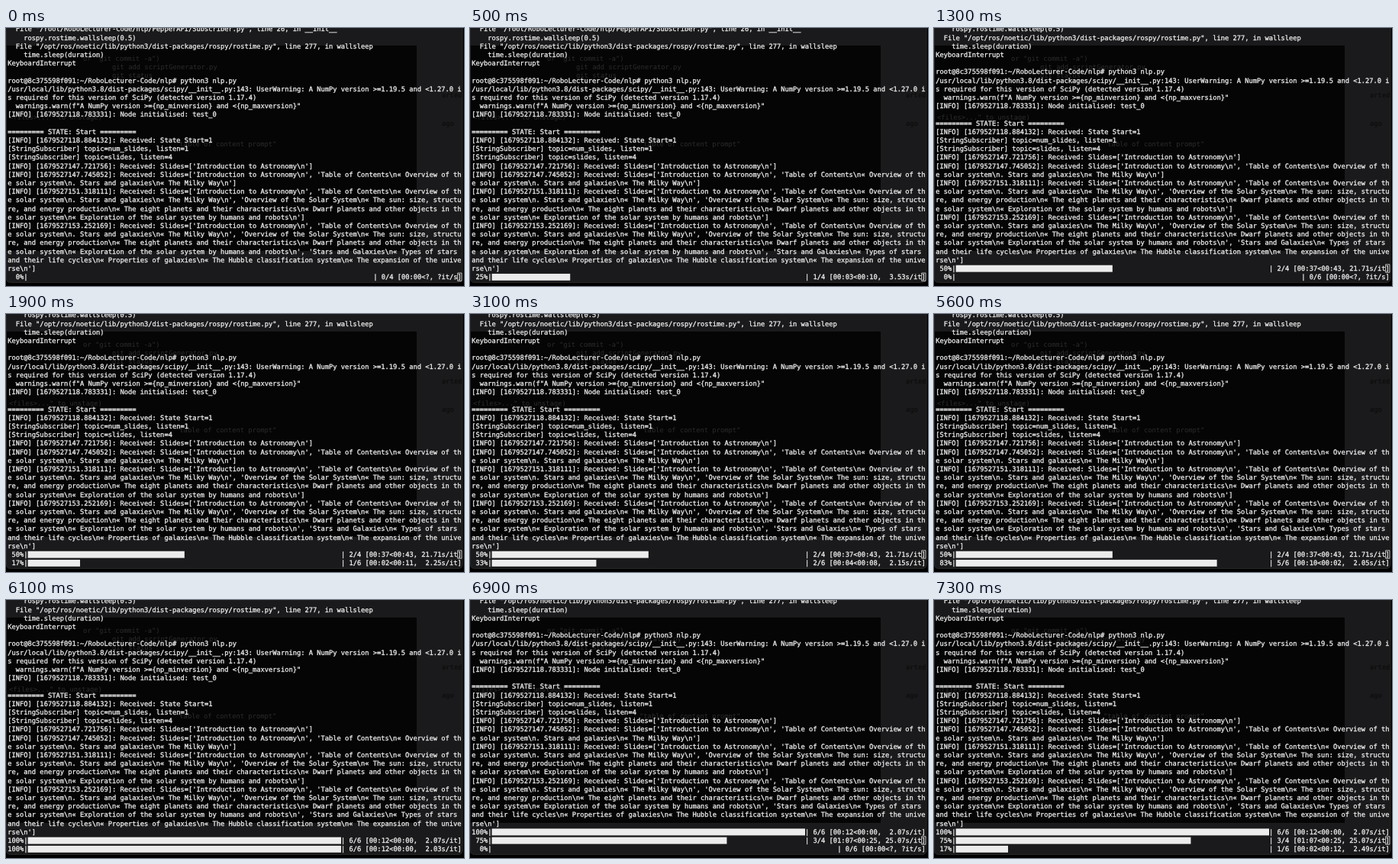
Write an HTML page with a canvas that moves like this. It is 600x338 px and loops after 8000 ms.

```html
<!DOCTYPE html>
<html lang="en">
<head>
<meta charset="utf-8">
<title>Terminal progress</title>
<style>
  html, body { margin: 0; width: 100%; height: 100%; overflow: hidden; background: #000; }
  canvas { display: block; width: 600px; height: 338px; }
</style>
</head>
<body>
<canvas id="stage"></canvas>
<script>
const W = 600, H = 338, LOOP = 8000;
const COLS = 113, CELL = 5.262, LEFT = 2.3, PITCH = 11.2, LAST_Y = 326;
const MONO = '"DejaVu Sans Mono", "Liberation Mono", monospace';
const TEXT = '#ececec';

const canvas = document.getElementById('stage');
const ctx = canvas.getContext('2d');
const dpr = window.devicePixelRatio || 1;
canvas.width = W * dpr;
canvas.height = H * dpr;
ctx.scale(dpr, dpr);

// Slide outlines, as logged after each update
const intro = String.raw`'Introduction to Astronomy\n'`;
const contents = String.raw`'Table of Contents\n« Overview of the solar system\n. Stars and galaxies\n« The Milky Way\n'`;
const solar = String.raw`'Overview of the Solar System\n« The sun: size, structure, and energy production\n« The eight planets and their characteristics\n« Dwarf planets and other objects in the solar system\n« Exploration of the solar system by humans and robots\n'`;
const stars = String.raw`'Stars and Galaxies\n« Types of stars and their life cycles\n« Properties of galaxies\n« The Hubble classification system\n« The expansion of the universe\n'`;

const info = (time, msg) => `[INFO] [1679527${time}]: ${msg}`;
const slides = (time, ...list) => info(time, `Received: Slides=[${list.join(', ')}]`);

const log = [
  '  File "/root/RoboLecturer-Code/nlp/PepperAPI/Subscriber.py", line 26, in __init__',
  '    rospy.rostime.wallsleep(0.5)',
  '  File "/opt/ros/noetic/lib/python3/dist-packages/rospy/rostime.py", line 277, in wallsleep',
  '    time.sleep(duration)',
  'KeyboardInterrupt',
  '',
  'root@8c375598f091:~/RoboLecturer-Code/nlp# python3 nlp.py',
  '/usr/local/lib/python3.8/dist-packages/scipy/__init__.py:143: UserWarning: A NumPy version >=1.19.5 and <1.27.0 is required for this version of SciPy (detected version 1.17.4)',
  '  warnings.warn(f"A NumPy version >={np_minversion} and <{np_maxversion}"',
  info('118.783331', 'Node initialised: test_0'),
  '',
  '========= STATE: Start =========',
  info('118.884132', 'Received: State Start=1'),
  '[StringSubscriber] topic=num_slides, listen=1',
  '[StringSubscriber] topic=slides, listen=4',
  slides('147.721756', intro),
  slides('147.745052', intro, contents),
  slides('151.318111', intro, contents, solar),
  slides('153.252169', intro, contents, solar, stars)
];

// Hard wrap at the terminal width
const rows = log.flatMap(line => {
  const parts = [];
  for (let i = 0; i === 0 || i < line.length; i += COLS) parts.push(line.slice(i, i + COLS));
  return parts;
});

const bar = (n, total, timing) => ({ n, total, timing });
const half = bar(2, 4, '00:37<00:43, 21.71s/it');
const done = bar(6, 6, '00:12<00:00,  2.07s/it');
const most = bar(3, 4, '01:07<00:25, 25.07s/it');
const idle = '00:00<?, ?it/s';

const steps = [
  [0, bar(0, 4, idle)],
  [500, bar(1, 4, '00:03<00:10,  3.53s/it')],
  [1300, half, bar(0, 6, idle)],
  [1900, half, bar(1, 6, '00:02<00:11,  2.25s/it')],
  [3100, half, bar(2, 6, '00:04<00:08,  2.15s/it')],
  [4200, half, bar(3, 6, '00:06<00:06,  2.09s/it')],
  [4500, half, bar(4, 6, '00:08<00:04,  2.02s/it')],
  [5600, half, bar(5, 6, '00:10<00:02,  2.05s/it')],
  [6100, done, bar(6, 6, '00:12<00:00,  2.03s/it')],
  [6900, done, most, bar(0, 6, idle)],
  [7300, done, most, bar(1, 6, '00:02<00:12,  2.49s/it')]
];

function setFont(size) {
  ctx.font = `${size}px ${MONO}`;
  ctx.textBaseline = 'alphabetic';
  ctx.textRendering = 'geometricPrecision';
}

// A thin outline gives the slightly heavy terminal weight
function write(text, col, y) {
  const x = LEFT + col * CELL;
  ctx.fillText(text, x, y + 3.1);
  ctx.strokeText(text, x, y + 3.1);
}

function drawBackdrop() {
  ctx.fillStyle = '#000';
  ctx.fillRect(0, 0, W, H);
  ctx.fillStyle = '#1a191b';
  ctx.strokeStyle = '#303030';
  ctx.lineWidth = 0.8;
  ctx.beginPath();
  ctx.roundRect(0.4, -12, 597.6, 345.4, 5);
  ctx.fill();
  ctx.stroke();

  // Window showing faintly through the terminal
  ctx.fillStyle = '#050505';
  ctx.fillRect(1, 23, 537, 269);
  setFont(8.8);
  ctx.fillStyle = '#2c2c2c';
  ctx.fillText('or "git commit -a")', 101, 43);
  ctx.fillText('git add scriptGenerator.py', 139, 54);
  ctx.fillText('git status', 139, 65);
  ctx.fillText('<files>..." to unstage)', 4, 120);
  ctx.fillText('"table of content prompt"', 222, 155);
  ctx.fillStyle = '#0a0a0a';
  ctx.fillText('arted', 571, 91);
  ctx.fillText('ago', 571, 128);
}

function drawBar({ n, total, timing }, y) {
  const percent = `${Math.round(100 * n / total)}%|`.padStart(5);
  const tail = `| ${n}/${total} [${timing}]`;
  const span = COLS - percent.length - tail.length;
  write(percent, 0, y);
  write(tail, COLS - tail.length, y);
  ctx.fillRect(LEFT + 5 * CELL, y - 4.1, span * n / total * CELL, 8.9);
}

function drawCursor(y) {
  ctx.lineWidth = 0.8;
  ctx.strokeRect(LEFT + (COLS - 1) * CELL, y - 5, CELL, 10.4);
}

function draw([, ...bars]) {
  drawBackdrop();
  setFont(CELL / 0.602);
  ctx.fillStyle = ctx.strokeStyle = TEXT;
  ctx.lineWidth = 0.32;
  ctx.lineJoin = 'round';
  const total = rows.length + bars.length;
  const rowY = i => LAST_Y - (total - 1 - i) * PITCH;
  rows.forEach((row, i) => write(row, 0, rowY(i)));
  bars.forEach((b, i) => drawBar(b, rowY(rows.length + i)));

  // The cursor rests on the first unfinished bar
  const active = bars.findIndex(b => b.n < b.total);
  if (active >= 0) drawCursor(rowY(rows.length + active));
}

let start, shown;
function tick(now) {
  start ??= now;
  const t = (now - start) % LOOP;
  const step = steps.findLast(s => s[0] <= t);
  if (step !== shown) draw(shown = step);
  requestAnimationFrame(tick);
}
draw(shown = steps[0]);
requestAnimationFrame(tick);
</script>
</body>
</html>
```
